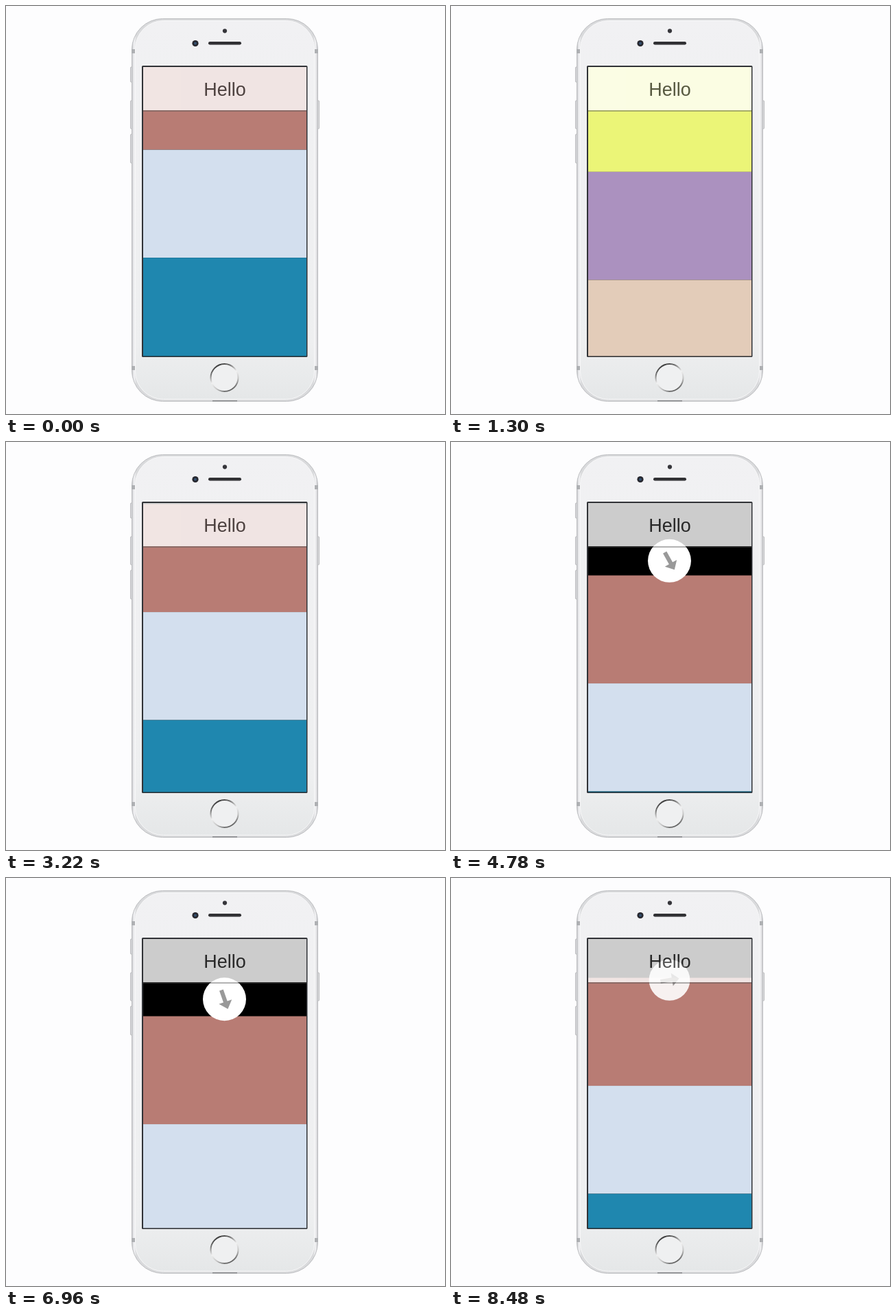
Animation, 640 px wide and 595 px high, one loop 8530 ms. Source, as an HTML page:

```html
<!DOCTYPE html>
<html lang="en">
<head>
<meta charset="utf-8">
<title>Pull to refresh</title>
<style>
  html, body { margin: 0; height: 100%; overflow: hidden; background: #fdfdfe; }
  svg { display: block; width: 100%; height: 100%; }
  text { font: 27px "Liberation Sans", Arial, sans-serif; text-anchor: middle; fill: #333; }
</style>
</head>
<body>
<svg viewBox="0 0 640 595">
  <defs>
    <linearGradient id="rim">
      <stop offset="0" stop-color="#c3c4c7"/>
      <stop offset=".012" stop-color="#f3f3f5"/>
      <stop offset=".024" stop-color="#d9dadc"/>
      <stop offset=".976" stop-color="#d9dadc"/>
      <stop offset=".988" stop-color="#f3f3f5"/>
      <stop offset="1" stop-color="#c3c4c7"/>
    </linearGradient>
    <linearGradient id="face" x2="0" y2="1">
      <stop offset="0" stop-color="#f1f1f3"/>
      <stop offset=".85" stop-color="#eeeff0"/>
      <stop offset="1" stop-color="#e5e7e8"/>
    </linearGradient>
    <linearGradient id="ring" x1=".25" y1="0" x2=".75" y2="1">
      <stop offset="0" stop-color="#2e2e2e"/>
      <stop offset=".22" stop-color="#777"/>
      <stop offset=".48" stop-color="#f2f2f2"/>
      <stop offset=".72" stop-color="#c4c4c4"/>
      <stop offset="1" stop-color="#4c4c4c"/>
    </linearGradient>
    <clipPath id="screen"><path d="M200 89H438V510.500H200Z"/></clipPath>
  </defs>

  <!-- phone -->
  <g fill="#e3e4e6" stroke="#a9aaad" stroke-width=".8">
    <rect x="181.500" y="89" width="4" height="22" rx="1"/>
    <rect x="181.500" y="138" width="4" height="41" rx="1"/>
    <rect x="181.500" y="187" width="4" height="42" rx="1"/>
    <rect x="453" y="138" width="3.500" height="41" rx="1"/>
  </g>
  <rect x="183.500" y="18.500" width="271" height="558" rx="45" fill="url(#rim)" stroke="#bcbdc0"/>
  <path d="M183 66H189M449 66H455M183 528H189M449 528H455" stroke="#aeb0b3" stroke-width="6"/>
  <rect x="188.500" y="21.500" width="261" height="552" rx="41" fill="url(#face)" stroke="#f8f8f9"/>
  <path d="M301 576H337" stroke="#97989b" stroke-width="2"/>
  <circle cx="319" cy="36.300" r="3.100" fill="#35353a"/>
  <circle cx="276" cy="54.500" r="4.600" fill="#26272e"/>
  <circle cx="276" cy="54.500" r="2" fill="#34506f"/>
  <rect x="295" y="52" width="48" height="4.500" rx="2.200" fill="#313134"/>
  <circle cx="318.500" cy="542" r="20" fill="#eff0f1" stroke="url(#ring)" stroke-width="2"/>
  <rect x="198" y="87" width="241.500" height="425" rx="1.500" fill="#303236"/>

  <g clip-path="url(#screen)">
    <path d="M200 89H438V511H200Z"/>
    <g id="list"></g>
    <g id="badge">
      <circle r="31.500" fill="#fff"/>
      <path id="arrow" d="M-14-3H4V-10L15 0 4 10V3H-14Z" fill="#999"/>
    </g>
    <g opacity=".8">
      <path d="M200 89H438V152H200Z" fill="#fff"/>
      <text x="319" y="131">Hello</text>
    </g>
    <path d="M200 153H438" stroke="#555" stroke-opacity=".45" stroke-width="2"/>
  </g>
</svg>
<script>
const LOOP = 8530, TOP = 89, ROW = 157.5, REVEAL = 63;
const get = id => document.getElementById(id);
const list = get('list'), badge = get('badge'), arrow = get('arrow');

list.innerHTML = ['#b87c74', '#d3dfee', '#1f87af', '#ebf577', '#ab91bf', '#e3ccb9']
  .map((fill, i) => `<rect x="200" y="${i * ROW}" width="238" height="${ROW}" fill="${fill}"/>`)
  .join('');

// [ms, list offset]: fling away, return, then three pulls past the top
const keys = [
  [0, -36.5], [350, -170], [800, -380], [1300, -477], [1520, -500], [1900, -450],
  [2500, -150], [2900, -15], [3220, 1.5], [3480, 24], [4350, 36], [4780, 105.5],
  [5000, 112], [5300, 104], [5700, 52.5], [6090, 5], [6240, 1], [6600, 60],
  [6960, 112.5], [7110, 116], [7450, 60], [7790, 0], [7870, 7], [8480, 56.5], [LOOP, 58]
];

// Slope at a key: flat at turning points, otherwise the harmonic mean of its neighbours
function slope(i) {
  const rise = k => (keys[k + 1][1] - keys[k][1]) / (keys[k + 1][0] - keys[k][0]);
  if (i === 0) return rise(0);
  if (i === keys.length - 1) return rise(i - 1);
  const a = rise(i - 1), b = rise(i);
  return a * b > 0 ? 2 * a * b / (a + b) : 0;
}

function offsetAt(t) {
  const i = keys.findIndex(k => k[0] > t) - 1;
  const [t0, y0] = keys[i], [t1, y1] = keys[i + 1];
  const h = t1 - t0, u = (t - t0) / h, v = 1 - u;
  return v * v * ((1 + 2 * u) * y0 + u * h * slope(i))
       + u * u * ((1 + 2 * v) * y1 - v * h * slope(i + 1));
}

function draw(now) {
  const pull = offsetAt(now % LOOP);
  const shown = Math.max(0, Math.min(1, pull / REVEAL));
  list.setAttribute('transform', `translate(0 ${TOP + pull})`);
  badge.setAttribute('opacity', shown);
  badge.setAttribute('transform',
    `translate(318.5 ${TOP + REVEAL / 2 + pull / 2}) scale(${0.5 + shown / 2})`);
  arrow.setAttribute('transform', `rotate(${Math.min(90, pull / REVEAL * 90 - 90)})`);
}

const start = performance.now();
function tick() {
  draw(performance.now() - start);
  requestAnimationFrame(tick);
}
tick();
</script>
</body>
</html>
```
